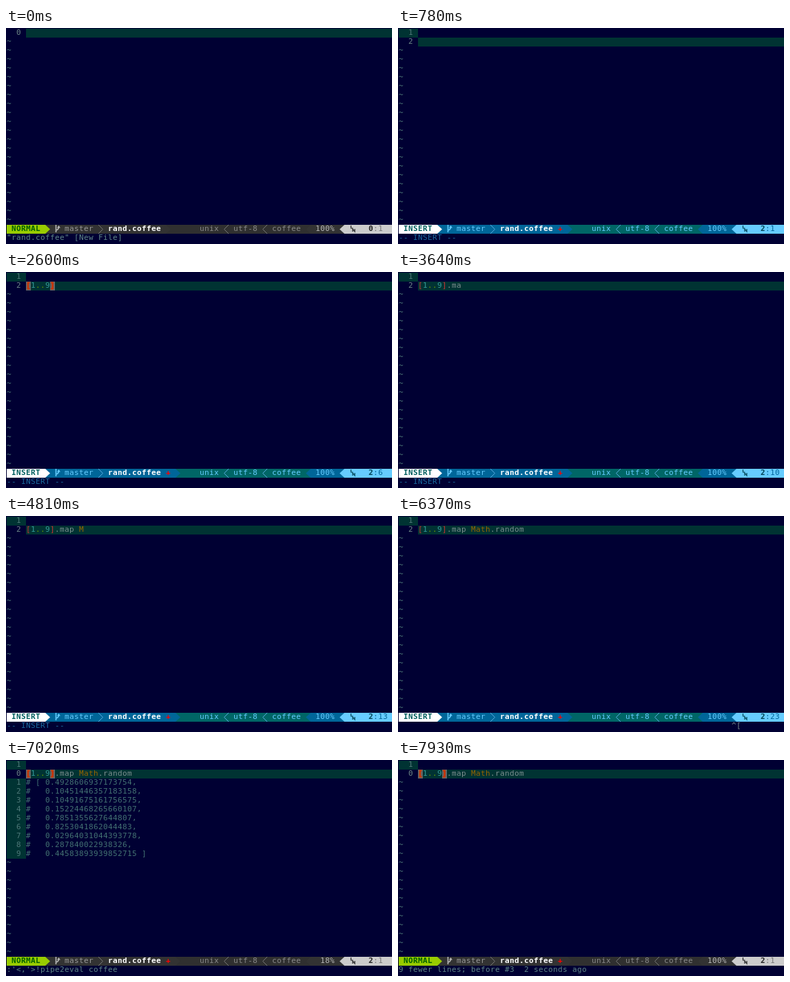
Write an HTML page that moves like this. It is 560 px wide and 315 px high and loops after 8000 ms.

```html
<!DOCTYPE html>
<html lang="en">
<head>
<meta charset="utf-8">
<title>rand.coffee</title>
<style>
html, body { margin: 0; width: 100%; height: 100%; overflow: hidden; background: #000033; }
svg { display: block; width: 560px; height: 315px; }
text { font: 11px "DejaVu Sans Mono", monospace; white-space: pre; }
.b { font-weight: bold; }
</style>
</head>
<body>
<svg id="stage" viewBox="0 0 560 315"></svg>
<script>
const LOOP = 8000, CW = 7, RH = 13, STATUS = 22, CMD = 23;
const NAVY = '#000033', LINE = '#003333', DIM = '#4d7878', CODE = '#7d8f8f';
const stage = document.getElementById('stage');
const X = col => 1 + col * CW;
const Y = row => 1 + row * RH;

const THEMES = {
  NORMAL: { mode: '#99cc00', modeInk: '#005f00', side: '#333333', mid: '#303030', ink: '#999999',
            dim: '#8a8a8a', pct: '#b8b8b8', thin: '#777777', pos: '#cccccc', posInk: '#222222', colInk: '#777777' },
  INSERT: { mode: '#ffffff', modeInk: '#005f5f', side: '#006699', mid: '#006666', ink: '#66ccff',
            dim: '#66ccff', pct: '#66ccff', thin: '#55aadd', pos: '#66ccff', posInk: '#004455', colInk: '#006699' }
};

const RESULTS = ['0.4928606937173754', '0.10451446357183158', '0.10491675161756575',
  '0.15224468265660107', '0.7851355627644807', '0.8253041862044483',
  '0.02964031044393778', '0.287840022938326', '0.44583893939852715'];

const INS = '-- INSERT --', RUN = ":'<,'>!pipe2eval coffee";
const FULL = '[1..9].map Math.random';
const base = { mode: 'INSERT', code: '', col: 1, match: false, msg: INS, keys: '', out: false };
const steps = [{ ...base, at: 0, mode: 'NORMAL', fresh: true, msg: '"rand.coffee" [New File]' }];
const step = (at, change = {}) => steps.push({ ...base, at, ...change });
const typed = (at, n) => step(at, { code: FULL.slice(0, n), col: n + 1 });
const paired = (at, inner) => step(at, { code: `[${inner}]`, col: inner.length + 2, match: true });

step(780);
paired(1690, '');
paired(2210, '1');
paired(2340, '1..');
paired(2600, '1..9');
step(3120, { code: '[1..9]', col: 7, match: true });
typed(3380, 7);
typed(3640, 9);
typed(3770, 11);
for (let i = 0; i < 5; i++) typed(4810 + i * 130, 12 + i);
[17, 19, 21, 22].forEach((n, i) => typed(5720 + i * 130, n));
step(6370, { code: FULL, col: 23, msg: '', keys: '^[' });
const done = { mode: 'NORMAL', code: FULL };
step(6500, { ...done, col: 22, msg: '' });
step(6630, { ...done, col: 1, match: true, msg: RUN });
step(7020, { ...done, match: true, msg: RUN, out: true });
step(7930, { ...done, match: true, msg: '9 fewer lines; before #3  2 seconds ago' });

function add(tag, attrs) {
  const el = document.createElementNS('http://www.w3.org/2000/svg', tag);
  for (const k in attrs) el.setAttribute(k, attrs[k]);
  return stage.appendChild(el);
}
const rect = (x, y, w, h, fill) => add('rect', { x, y, width: w, height: h, fill });
const cells = (col, row, n, fill) => rect(X(col), Y(row), n * CW, RH, fill);
const path = (d, stroke, width = 1) => add('path', { d, fill: 'none', stroke, 'stroke-width': width });

function text(col, row, str, fill, bold) {
  const x = [...str].map((_, i) => X(col + i)).join(' ');
  const el = add('text', { x, y: Y(row) + 9, fill, class: bold ? 'b' : '' });
  el.textContent = str;
  return el;
}
// Solid or thin powerline separator; dir is 1 for right, -1 for left.
function arrow(col, dir, fill) {
  const x = X(col) + (dir < 0 ? CW : 0), y = Y(STATUS);
  add('path', { d: `M${x} ${y}l${dir * CW} 6.5l${-dir * CW} 6.5z`, fill });
}
function chevron(col, dir, stroke) {
  const x = X(col) + (dir < 0 ? CW : 0), y = Y(STATUS);
  path(`M${x} ${y}l${dir * 6.5} 6.5l${-dir * 6.5} 6.5`, stroke);
}

function number(row, n, current) {
  if (!current) cells(0, row, 4, LINE);
  text(2, row, String(n), current ? '#6b8585' : DIM);
}

function drawCode(s, row) {
  const word = /Math|Mat|Ma|M/.exec(s.code);
  [...s.code].forEach((ch, i) => {
    const bracket = ch === '[' || ch === ']';
    let ink = CODE;
    if (bracket) ink = '#cc3333';
    else if (/\d/.test(ch)) ink = '#339999';
    else if (i > 1 && i < 4) ink = '#669900';
    else if (word && i >= word.index && i < word.index + word[0].length) ink = '#996600';
    const lit = bracket && s.match;
    if (lit) cells(4 + i, row, 1, '#666666');
    const el = text(4 + i, row, ch, lit ? '#cc3300' : ink, lit);
    if (lit) { el.setAttribute('stroke', '#cc3300'); el.setAttribute('stroke-width', 1); }
  });
}

function drawStatus(s) {
  const c = THEMES[s.mode], y = Y(STATUS), end = s.fresh ? 33 : 35;
  cells(0, STATUS, 80, c.mid);
  cells(0, STATUS, end, c.side);
  arrow(end, 1, c.side);
  cells(0, STATUS, 8, c.mode);
  arrow(8, 1, c.mode);
  text(1, STATUS, s.mode, c.modeInk, true);

  const bx = X(10);
  path(`M${bx + 1.5} ${y}v11M${bx + 1.5} ${y + 8}q4 -1 4 -5`, c.pct, 1.6);
  add('path', { d: `M${bx + 3} ${y + 4.5}h5l-2.5 -3.5z`, fill: c.pct });
  text(12, STATUS, 'master', c.ink);
  chevron(19, 1, c.thin);
  text(21, STATUS, 'rand.coffee', '#ffffff', true);
  if (!s.fresh) text(33, STATUS, '+', '#ff0000', true);

  text(40, STATUS, 'unix', c.dim);
  chevron(45, -1, c.thin);
  text(47, STATUS, 'utf-8', c.dim);
  chevron(53, -1, c.thin);
  text(55, STATUS, 'coffee', c.dim);
  arrow(62, -1, c.side);
  cells(63, STATUS, 7, c.side);
  text(64, STATUS, s.out ? ' 18%' : '100%', c.pct);
  arrow(69, -1, c.pos);
  cells(70, STATUS, 10, c.pos);

  const lx = X(71) + 2;
  path(`M${lx + .5} ${y + 1}v4h3`, c.posInk, 1.2);
  path(`M${lx + 3} ${y + 10}v-4l3 4v-4`, c.posInk, 1.2);
  text(75, STATUS, s.fresh ? '0' : '2', c.posInk, true);
  text(76, STATUS, ':' + s.col, c.colInk);
}

function draw(s) {
  stage.replaceChildren();
  rect(0, 0, 560, 315, NAVY);
  const row = s.fresh ? 0 : 1;
  cells(4, row, 76, LINE);
  if (!s.fresh) number(0, 1, false);
  number(row, s.mode === 'NORMAL' ? 0 : 2, true);
  drawCode(s, row);

  let next = row + 1;
  if (s.out) RESULTS.forEach((v, i) => {
    number(next, i + 1, false);
    const tail = i === RESULTS.length - 1 ? ' ]' : ',';
    text(4, next++, (i ? '#   ' : '# [ ') + v + tail, '#437272');
  });
  for (; next < STATUS; next++) text(0, next, '~', DIM);

  drawStatus(s);
  text(0, CMD, s.msg, s.msg === INS ? '#1a6a9e' : '#5f8787');
  text(69, CMD, s.keys, CODE);
}

let shown = null;
const start = performance.now();
function tick() {
  const t = (performance.now() - start) % LOOP;
  const s = steps.findLast(e => e.at <= t);
  if (s !== shown) draw(shown = s);
  requestAnimationFrame(tick);
}
tick();
</script>
</body>
</html>
```
